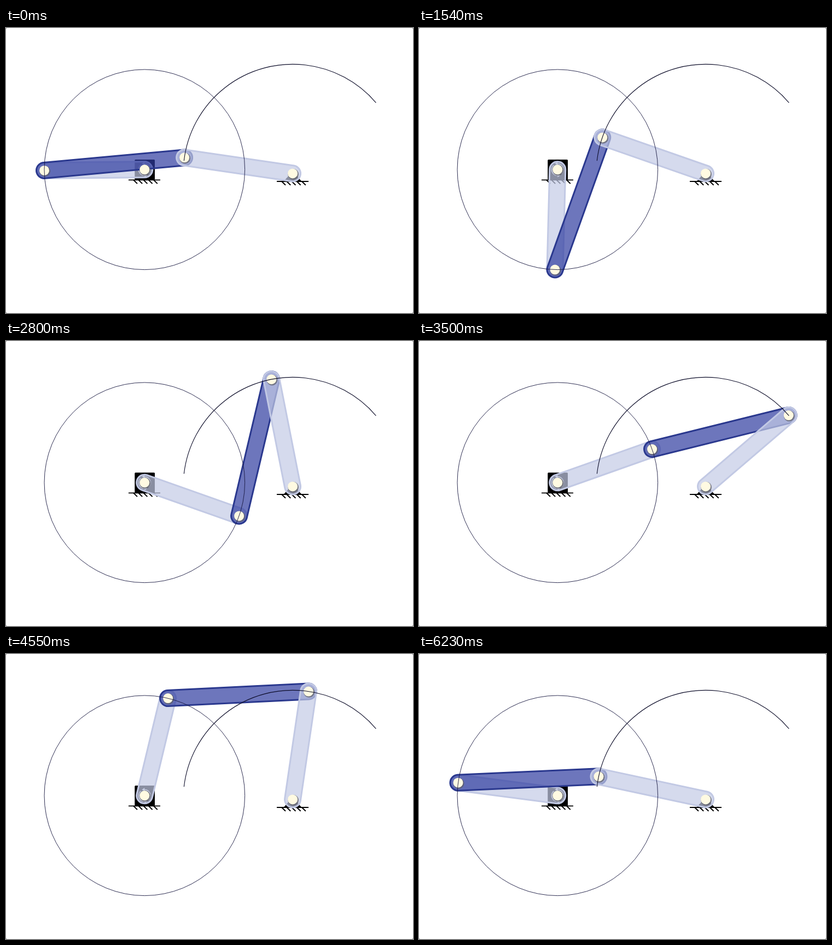
Animation of 744 by 522 pixels, one loop 6300 ms. Source, as an HTML page with a canvas:

```html
<!DOCTYPE html>
<html lang="en">
<head>
<meta charset="utf-8">
<title>Four-bar linkage</title>
<style>
  html, body { margin: 0; width: 100%; height: 100%; overflow: hidden; background: #fff; }
  canvas { display: block; }
</style>
</head>
<body>
<canvas id="stage" width="744" height="522"></canvas>
<script>
const ctx = document.getElementById('stage').getContext('2d');
const TAU = Math.PI * 2;
const RAD = Math.PI / 180;
const STEP_MS = 70;
const STEPS = 90;

const motorPin = { x: 253.3, y: 259.3 };
const rockerPin = { x: 524, y: 266.4 };
const CRANK = 183.3, COUPLER = 257.2, ROCKER = 200;

const pale = { fill: 'rgba(196,203,229,.7)', stroke: 'rgb(194,201,228)' };
const navy = { fill: 'rgba(48,60,160,.7)', stroke: 'rgb(42,56,142)' };

// Crank angle in degrees at certain steps; the drive slows a little midway.
const crankKeys = [
  [0, 179.5], [30, 59.5], [40, 19.5], [50, -19.5], [60, -58.7],
  [65, -76.5], [70, -97.2], [79, -132.6], [89, -172.6]
];

function crankAngle(step) {
  const i = crankKeys.findIndex((key, n) => n > 0 && step <= key[0]);
  const [s0, a0] = crankKeys[i - 1], [s1, a1] = crankKeys[i];
  return (a0 + (a1 - a0) * (step - s0) / (s1 - s0)) * RAD;
}

// Where coupler and rocker meet: intersection of two circles.
function joint(crankEnd) {
  const dx = rockerPin.x - crankEnd.x, dy = rockerPin.y - crankEnd.y;
  const d = Math.hypot(dx, dy);
  const along = (COUPLER ** 2 - ROCKER ** 2 + d * d) / (2 * d);
  const side = Math.sqrt(Math.max(0, COUPLER ** 2 - along ** 2));
  return {
    x: crankEnd.x + (dx * along + dy * side) / d,
    y: crankEnd.y + (dy * along - dx * side) / d
  };
}

function line(color, width, ...points) {
  ctx.beginPath();
  points.forEach(([x, y]) => ctx.lineTo(x, y));
  ctx.strokeStyle = color;
  ctx.lineWidth = width;
  ctx.stroke();
}

function disc(x, y, r, color) {
  ctx.beginPath();
  ctx.arc(x, y, r, 0, TAU);
  ctx.fillStyle = color;
  ctx.fill();
}

function link(p, q, style) {
  const a = Math.atan2(q.y - p.y, q.x - p.x), r = 14.5;
  ctx.beginPath();
  ctx.arc(p.x, p.y, r, a + Math.PI / 2, a + Math.PI * 1.5);
  ctx.arc(q.x, q.y, r, a - Math.PI / 2, a + Math.PI / 2);
  ctx.closePath();
  ctx.fillStyle = style.fill;
  ctx.fill();
  ctx.strokeStyle = style.stroke;
  ctx.lineWidth = 3;
  ctx.stroke();
}

function pin({ x, y }) {
  disc(x + 1.1, y + 1.3, 10, 'rgba(92,92,100,.7)');
  disc(x, y, 9, '#fffae2');
}

function ground(x, y) {
  line('#000', 1.8, [x - 29, y], [x + 29, y]);
  for (let i = 0; i < 5; i++) {
    const left = x - 20 + i * 9.2;
    line('#000', 2, [left, y], [left + 7, y + 6.8]);
  }
}

function supports() {
  ground(253, 278.3);
  ground(524, 281);
  ctx.fillStyle = '#000';
  ctx.beginPath();
  ctx.roundRect(235.3, 241, 36.7, 37.5, 1.5);
  ctx.fill();
  ctx.beginPath();
  [[507, 281.5], [519, 268], [529, 268], [541, 281.5]].forEach(([x, y]) => ctx.lineTo(x, y));
  ctx.fill();
}

function turnArrows() {
  const { x, y } = motorPin, r = 10.8;
  ctx.save();
  ctx.translate(x, y);
  for (let i = 0; i < 2; i++) {
    ctx.beginPath();
    ctx.arc(0, 0, r, 50 * RAD, -95 * RAD, true);
    ctx.strokeStyle = 'rgba(240,242,250,.85)';
    ctx.lineWidth = 1.5;
    ctx.stroke();
    ctx.beginPath();
    [[-5, -r], [0, -r - 3.5], [0, -r + 2.5]].forEach(([px, py]) => ctx.lineTo(px, py));
    ctx.fillStyle = 'rgba(240,242,250,.85)';
    ctx.fill();
    ctx.rotate(Math.PI);
  }
  ctx.restore();
}

function traces() {
  ctx.strokeStyle = '#17173f';
  ctx.lineWidth = 0.9;
  ctx.beginPath();
  ctx.arc(motorPin.x, motorPin.y, CRANK, 0, TAU);
  ctx.stroke();
  ctx.strokeStyle = '#0c0c28';
  ctx.lineWidth = 1.1;
  ctx.beginPath();
  ctx.arc(rockerPin.x, rockerPin.y, ROCKER, 186.7 * RAD, 319.6 * RAD);
  ctx.stroke();
}

function corners() {
  ctx.fillStyle = '#777';
  for (const x of [0, 743]) for (const y of [0, 521]) ctx.fillRect(x, y, 1, 1);
}

function draw(ms) {
  const step = Math.floor(ms / STEP_MS) % STEPS;
  const a = crankAngle(step);
  const crankEnd = {
    x: motorPin.x + CRANK * Math.cos(a),
    y: motorPin.y + CRANK * Math.sin(a)
  };
  const rockerEnd = joint(crankEnd);

  ctx.fillStyle = '#fff';
  ctx.fillRect(0, 0, 744, 522);
  corners();
  supports();
  turnArrows();
  link(motorPin, crankEnd, pale);
  link(crankEnd, rockerEnd, navy);
  link(rockerEnd, rockerPin, pale);
  [motorPin, crankEnd, rockerEnd, rockerPin].forEach(pin);
  traces();
}

const start = performance.now();
function tick() {
  draw(performance.now() - start);
  requestAnimationFrame(tick);
}
tick();
</script>
</body>
</html>
```
